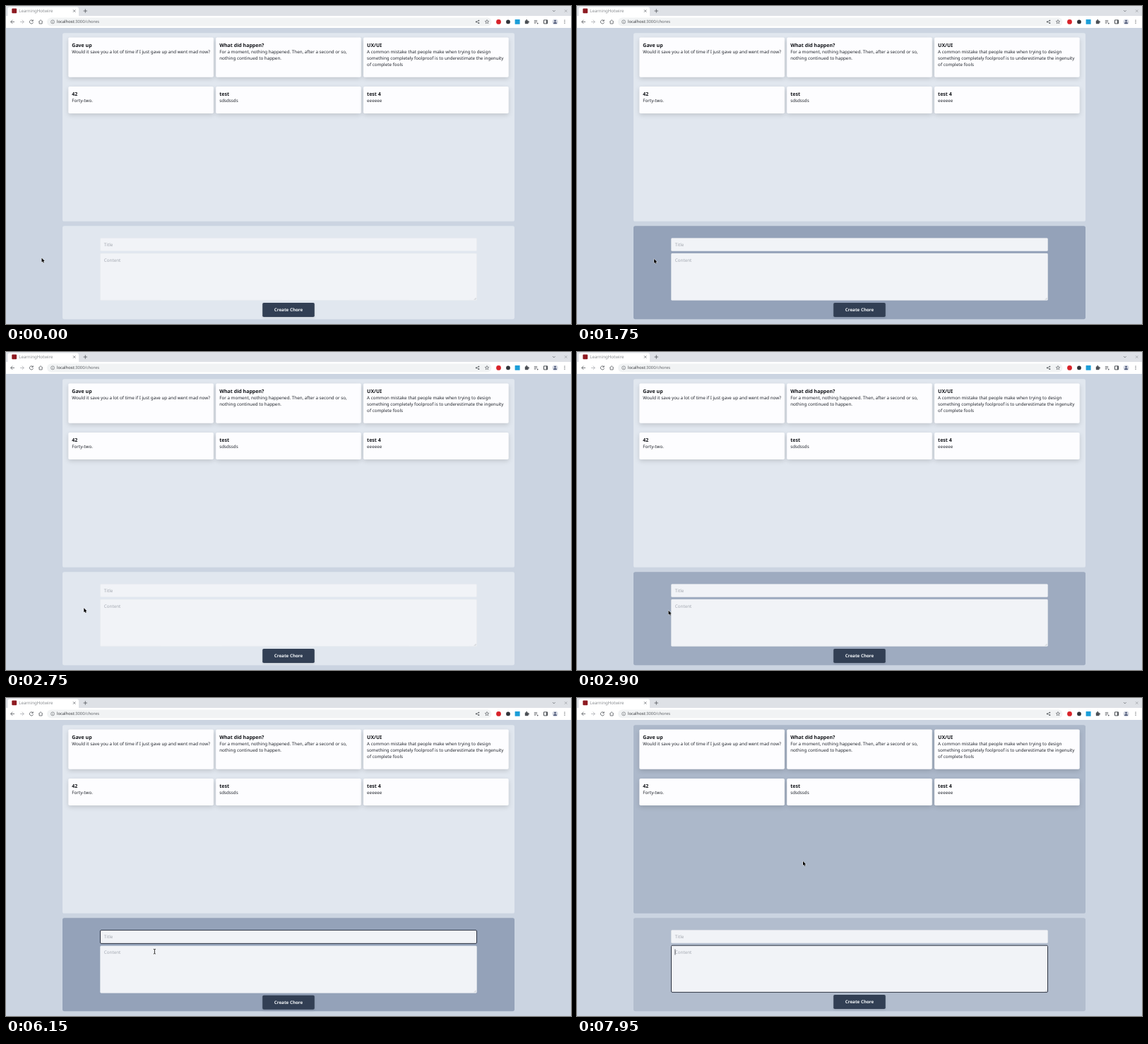
An HTML page with a canvas for the animation above (8 s loop, 800 by 450 pixels).

```html
<!DOCTYPE html>
<html lang="en">
<head>
<meta charset="utf-8">
<title>Chores</title>
<style>
html, body { margin: 0; width: 100%; height: 100%; overflow: hidden; background: #cbd4e1; }
canvas { display: block; width: 800px; height: 450px; }
</style>
</head>
<body>
<canvas id="stage" width="800" height="450"></canvas>
<script>
const ctx = document.getElementById('stage').getContext('2d');
const LOOP = 8000, STEP = 50, BLINK = 600, FADE = 150;
const FONT = '"Noto Sans", "Open Sans", sans-serif';
const PAGE = '#cbd4e1', INK = '#4b4f54', GREY = '#5f6368';
const LIGHT = [225, 231, 239], DARK = [148, 162, 185];
const BUTTON = [50, 63, 84], BUTTON_HOVER = [15, 23, 42];

const CARDS = [
  ['Gave up', 'Would it save you a lot of time if I just gave up and went mad now?'],
  ['What did happen?', 'For a moment, nothing happened. Then, after a second or so,', 'nothing continued to happen.'],
  ['UX/UI', 'A common mistake that people make when trying to design', 'something completely foolproof is to underestimate the ingenuity', 'of complete fools'],
  ['42', 'Forty-two.'],
  ['test', 'sdsdssds'],
  ['test 4', 'eeeeee']
];

const linear = p => p;
const easeIn = p => p * p;
const easeOut = p => 1 - (1 - p) * (1 - p);
const smooth = p => p * p * (3 - 2 * p);

// Pointer moves, each from where the last one ended
const HOME = { x: 50.5, y: 356.5 };
const MOVES = [
  { from: 550, to: 1150, x: 130, y: 360, ease: easeIn },
  { from: 1700, to: 2050, x: 51.5, y: 352, ease: easeOut },
  { from: 2450, to: 3250, x: 148, y: 369, ease: easeOut },
  { from: 4100, to: 4750, x: 164, y: 338.5, ease: smooth },
  { from: 5500, to: 5800, x: 190, y: 336, ease: smooth },
  { from: 5900, to: 6350, x: 225, y: 375, ease: smooth },
  { from: 6400, to: 7050, x: 391, y: 425, ease: easeOut },
  { from: 7700, to: 7950, x: 320, y: 231, ease: linear }
];

// Times at which the pointer enters and leaves, in turn
const HOVER = { form: [957, 1936, 2810, 7904], list: [7884], button: [6820, 7715] };

const FOCUS = [
  { at: 3400, on: 'content' },
  { at: 5050, on: 'title' },
  { at: 6350, on: 'content' }
];

const clamp = p => Math.min(1, Math.max(0, p));

// cubic-bezier(.4, 0, .2, 1), solved by bisection
function fade(p) {
  p = clamp(p);
  let lo = 0, hi = 1;
  while (hi - lo > 1e-4) {
    const s = (lo + hi) / 2, r = 1 - s;
    if (1.2 * r * r * s + 0.6 * r * s * s + s ** 3 < p) lo = s; else hi = s;
  }
  return smooth((lo + hi) / 2);
}

const hover = (t, name) => clamp(HOVER[name].reduce(
  (sum, at, i) => sum + (i % 2 ? -1 : 1) * fade((t - at) / FADE), 0));

const mix = (a, b, p) => `rgb(${a.map((v, i) => Math.round(v + (b[i] - v) * p))})`;

function pointer(t) {
  let { x, y } = HOME;
  for (const m of MOVES) {
    const p = m.ease(clamp((t - m.from) / (m.to - m.from)));
    x += (m.x - x) * p;
    y += (m.y - y) * p;
  }
  return [x, y];
}

function box(x, y, w, h, r, fill) {
  ctx.beginPath();
  ctx.roundRect(x, y, w, h, r);
  ctx.fillStyle = fill;
  ctx.fill();
}

function raised(x, y, w, h, fill, blur, dy) {
  ctx.save();
  ctx.shadowColor = 'rgba(0,0,0,.14)';
  ctx.shadowBlur = blur;
  ctx.shadowOffsetY = dy;
  box(x, y, w, h, 1.8, fill);
  ctx.restore();
}

function text(str, x, y, size, color, weight = 400) {
  ctx.font = `${weight} ${size}px ${FONT}`;
  ctx.fillStyle = color;
  ctx.fillText(str, x, y);
}

function dot(x, y, r, fill) {
  ctx.beginPath();
  ctx.arc(x, y, r, 0, 7);
  ctx.fillStyle = fill;
  ctx.fill();
}

// Strokes a path drawn around the point x, y
function line(x, y, d, color = INK, width = 0.75) {
  ctx.save();
  ctx.translate(x, y);
  ctx.strokeStyle = color;
  ctx.lineWidth = width;
  ctx.stroke(new Path2D(d));
  ctx.restore();
}

function star(x, y, r) {
  let d = '';
  for (let i = 0; i < 10; i++) {
    const a = i * Math.PI / 5, q = i % 2 ? r * 0.45 : r;
    d += `${i ? 'L' : 'M'}${q * Math.sin(a)} ${-q * Math.cos(a)}`;
  }
  line(x, y, d + 'z', INK, 0.6);
}

function browser() {
  const cross = 'M-1.7-1.7L1.7 1.7M1.7-1.7L-1.7 1.7', mid = 22.4;
  box(0, 0, 800, 14, 0, '#dee1e6');
  box(2.5, 1.5, 100.5, 14, [3, 3, 0, 0], '#fff');
  box(0, 14, 800, 17, 0, '#fff');
  box(8.3, 3.5, 6.8, 6.8, 1, '#8e1b22');
  text('LearningHotwire', 18.2, 9.2, 6.15, '#8b8e92');
  line(96.7, 7, cross, GREY);
  line(112.3, 7, 'M-2.7 0h5.4M0-2.7v5.4');
  line(775.8, 7, 'M-1.8-.9L0 .9 1.8-.9', GREY);
  line(792.7, 7, cross, '#9a9da1');

  line(9.3, mid, 'M2.7 0h-5.4M0-2.6L-2.6 0 0 2.6');
  line(22.7, mid, 'M-2.7 0h5.4M0-2.6L2.6 0 0 2.6', '#a6a9ad');
  line(36, mid, 'M2-1.6A2.6 2.6 0 1 0 2.5 .7M2.3-3v2h-2');
  line(49.1, mid, 'M-2.9 0L0-2.7 2.9 0M-2-.6v3.2h4v-3.2');
  box(58, 16.4, 629.5, 12.2, 6.1, '#f1f3f4');
  line(66.1, mid, 'M-2.5 0a2.5 2.5 0 1 0 5 0a2.5 2.5 0 1 0-5 0M0-.4v1.8m0-3v.6', GREY, 0.6);
  text('localhost', 72, 24.4, 5.83, '#35383c');
  const host = ctx.measureText('localhost').width;
  text(':3000/chores', 72 + host, 24.4, 5.83, GREY);

  line(667.6, mid, 'M1.8-1.8L-1.8 0 1.8 1.8', INK, 0.6);
  for (const side of [-1, 0, 1]) {
    dot(side ? 669.4 : 665.8, mid + side * 1.8, 0.9, INK);
    dot(791, mid + side * 2.2, 0.6, INK);
    line(750, mid + side * 1.8, side < 1 ? 'M-2.2 0h4.4' : 'M-2.2 0h2.6');
  }
  star(681, mid, 2.9);
  dot(697.5, mid, 3.4, '#d8232a');
  dot(711, mid, 2.9, '#30343a');
  box(720.6, 19, 7, 6.8, 0.5, '#1c9ed8');
  box(734.8, 20.4, 4.8, 4.8, 0.6, INK);
  dot(737.2, 20, 1, INK);
  dot(740, 22.6, 1, INK);
  dot(752.7, 24.6, 0.9, INK);
  line(764, mid, 'M-2.5-2.5h5v5h-5zM1.5-2.5v5', INK, 1);
  dot(777.5, mid, 4, '#d5d9e3');
  dot(777.5, 21.1, 1.3, '#4a5575');
  box(775.1, 22.9, 4.8, 2, [1.6, 1.6, 0, 0], '#4a5575');
}

function list(t) {
  box(80, 38.2, 640, 266.6, 2.6, mix(LIGHT, DARK, hover(t, 'list')));
  CARDS.forEach(([title, ...lines], i) => {
    const lower = i > 2;
    const x = 88.3 + 208.9 * (i % 3), y = lower ? 114 : 44.5;
    raised(x, y, 205.6, lower ? 38 : 56.3, '#fdfdff', 6, 2.4);
    text(title, x + 5, y + 13, 7.03, '#111318', 700);
    lines.forEach((str, row) => text(str, x + 5, y + 22.3 + row * 9.2, 6.25, '#20242b'));
  });
}

function field(y, h, label, focused, caret) {
  const base = y + 11.5;
  box(133.4, y, 533.2, h, 1.4, '#f1f3f7');
  ctx.beginPath();
  ctx.roundRect(133.5, y + 0.2, 533, h - 0.4, 1.4);
  ctx.strokeStyle = focused ? '#1a2130' : '#e5e7eb';
  ctx.lineWidth = focused ? 0.9 : 0.4;
  ctx.stroke();
  text(label, 138.8, base, 6.25, '#a3a8b1');
  if (focused && caret) box(138.6, base - 6, 0.7, 8, 0, '#20242b');
}

function form(t) {
  const focus = FOCUS.filter(f => f.at <= t).pop() || { at: 0, on: '' };
  const caret = Math.floor((t - focus.at) / BLINK) % 2 === 0;
  const grow = focus.on === 'title' ? 0.8 : 0;
  box(80, 311.2, 640, 132, 2.6, mix(LIGHT, DARK, hover(t, 'form')));
  field(328.4, 18.4 + grow, 'Title', focus.on === 'title', caret);
  field(350 + grow, 66.6, 'Content', focus.on === 'content', caret);
  line(664.5, 414.5 + grow, 'M-1.5 1.1l2.6-2.6m-1 2.6l1-1', '#8b9098', 0.4);
  raised(363.2, 420 + grow, 73.6, 20, mix(BUTTON, BUTTON_HOVER, hover(t, 'button')), 3, 1);
  ctx.textAlign = 'center';
  text('Create Chore', 400, 432.4 + grow, 6.25, '#f4f7fa', 600);
  ctx.textAlign = 'left';
}

function solid(x, y, d) {
  line(x, y, d, '#fff', 0.9);
  ctx.save();
  ctx.translate(x, y);
  ctx.fillStyle = '#000';
  ctx.fill(new Path2D(d));
  ctx.restore();
}

function cursor(t) {
  const [x, y] = pointer(t);
  const within = (l, top, r, b) => x > l && x < r && y > top && y < b;
  if (within(133, 328, 667, 347) || within(133, 350, 667, 417)) {
    const beam = 'M-1.5-3.3Q0-3.3 0-2.7Q0-3.3 1.5-3.3M0-2.7v5.4M-1.5 3.3Q0 3.3 0 2.7Q0 3.3 1.5 3.3';
    line(x, y, beam, '#fff', 1.5);
    line(x, y, beam, '#000', 0.8);
  } else if (within(363, 420, 437, 440)) {
    solid(x, y, 'M-.6.4q.6-.8 1.2 0v2.3l2.6.6q.6.3.5 1l-.5 2.7h-3.4l-2.1-2.6q.1-.9.9-.5l.8.6z');
  } else {
    solid(x, y, 'M0 0v6l1.4-1.2 1 2.1 1-.5-1-2h1.9z');
  }
}

function draw(now) {
  const t = Math.floor(now % LOOP / STEP) * STEP;
  ctx.textRendering = 'geometricPrecision';
  box(0, 0, 800, 450, 0, PAGE);
  browser();
  list(t);
  form(t);
  cursor(t);
}

const start = performance.now();
function frame() {
  draw(performance.now() - start);
  requestAnimationFrame(frame);
}
frame();
</script>
</body>
</html>
```
